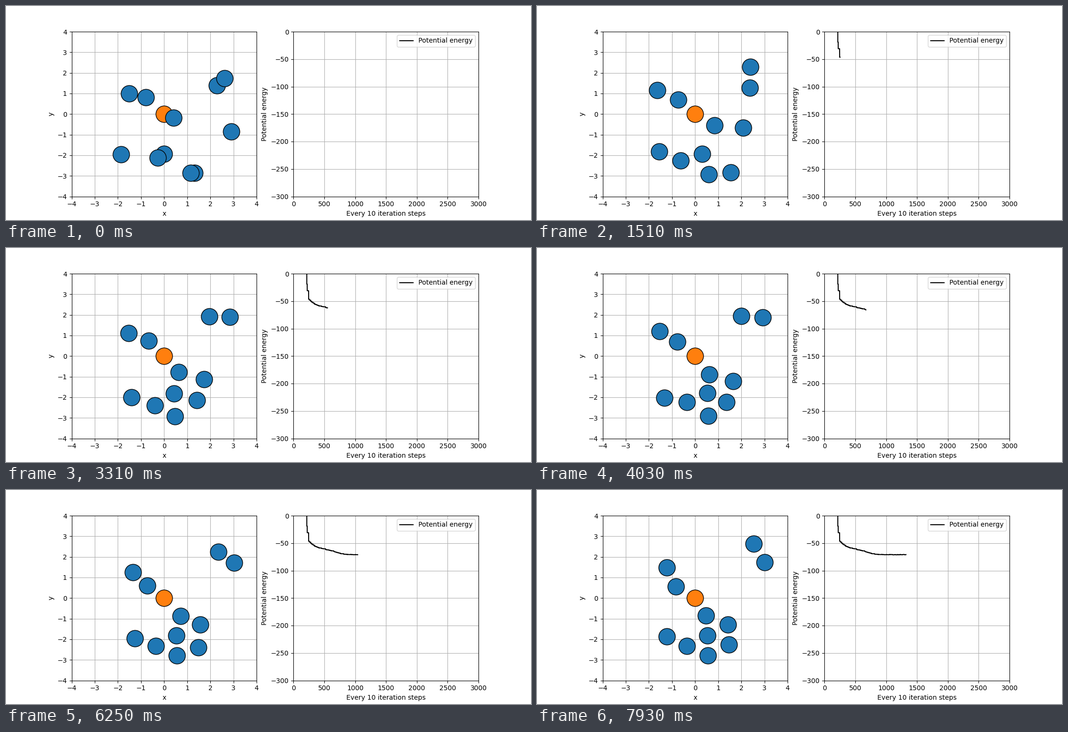
A matplotlib script that plays this animation: 1100x450 px, repeating every 7.99 s.

```python
import numpy as np
import matplotlib.pyplot as plt
from matplotlib.animation import FuncAnimation

LOOP_MS = 7990
STEPS = 133
POINTS_PER_STEP = 10

# Waypoints are reached at these steps; exponents below 1 ease out, above 1 ease in
KEYS = [0, 25, 80, 132]
EASE = [1, 0.35, 1.6]

# Stage pixels of each particle's waypoints; a short list rests at its last one
PARTICLES = [
    [(258, 184), (252, 177), (258, 176), (272, 163)],
    [(293, 192), (296, 197), (300, 194), (291, 203)],
    [(351, 235), (372, 251), (364, 263), (354, 264)],
    [(472, 264), (432, 256), (406, 282), (400, 283)],
    [(241, 312), (256, 306), (270, 311), (272, 308)],
    [(331, 311), (346, 311), (357, 306)],
    [(318, 319), (301, 325), (314, 328)],
    [(395, 351), (406, 350), (400, 324), (402, 325)],
    [(387, 351), (360, 354), (358, 348)],
    [(442, 167), (446, 172), (474, 150), (477, 152)],
    [(458, 152), (447, 128), (427, 140), (454, 113)],
]


def hold(rng, values, rate):
    """Keep each value until the next accepted move; the ends always count."""
    n = len(values)
    accepted = rng.random(n) < rate
    accepted[-1] = True
    return values[np.maximum.accumulate(np.where(accepted, np.arange(n), 0))]


def walk(rng, start, end, steps, ease):
    """Jittery steps from start to end, without the start itself."""
    start, end = np.array(start), np.array(end)
    u = np.linspace(0, 1, steps + 1)[:, None]
    path = start + (end - start) * u ** ease
    if (start != end).any():
        noise = np.cumsum(rng.normal(0, 1, path.shape), axis=0)
        path += noise - noise[0] - (noise[-1] - noise[0]) * u
    return hold(rng, path, 0.4)[1:]


def particle_path(rng, points):
    points = points + [points[-1]] * (len(KEYS) - len(points))
    legs = [walk(rng, points[i], points[i + 1], KEYS[i + 1] - KEYS[i], ease)
            for i, ease in enumerate(EASE)]
    return np.concatenate([points[:1]] + legs)


def to_data(px):
    """Stage pixels to units of the left axes."""
    x = (px[..., 0] - 331) / 387.5 * 8
    y = (227 - px[..., 1]) / 346.5 * 8
    return np.stack([x, y], axis=-1)


def energy_curve(rng):
    """Three sudden drops, then a stepped relaxation in two stages."""
    t = np.arange(214, STEPS * POINTS_PER_STEP)
    relax = -63 + 16.5 * np.exp(-(t - 245) / 130) - 8 / (1 + np.exp((690 - t) / 60))
    relax = hold(rng, relax + rng.uniform(-0.3, 0.3, len(t)), 0.1)
    energy = np.select([t < 215, t < 222, t < 245, t < 250], [400, -19, -31, -46], relax)
    return t, energy


rng = np.random.default_rng(4)
paths = to_data(np.stack([particle_path(rng, p) for p in PARTICLES], axis=1))
steps, energy = energy_curve(rng)

fig, (box, graph) = plt.subplots(1, 2, figsize=(11, 4.5), dpi=100)

ball = dict(marker="o", markersize=25, markeredgecolor="black",
            markeredgewidth=1, linestyle="none")
box.plot([0], [0], color="tab:orange", **ball)
balls, = box.plot([], [], color="tab:blue", **ball)
box.set(xlim=(-4, 4), ylim=(-4, 4), xlabel="x", ylabel="y",
        xticks=range(-4, 5), yticks=range(-4, 5))
box.grid()

curve, = graph.plot([], [], color="black", label="Potential energy")
graph.set(xlim=(0, 3000), ylim=(-300, 0),
          xlabel="Every 10 iteration steps", ylabel="Potential energy")
graph.grid()
graph.legend(loc="upper right")


def update(k):
    balls.set_data(paths[k, :, 0], paths[k, :, 1])
    shown = steps <= k * POINTS_PER_STEP
    curve.set_data(steps[shown], energy[shown])
    return balls, curve


anim = FuncAnimation(fig, update, frames=STEPS, interval=LOOP_MS / STEPS,
                     repeat=True, repeat_delay=0)
plt.show()
```
